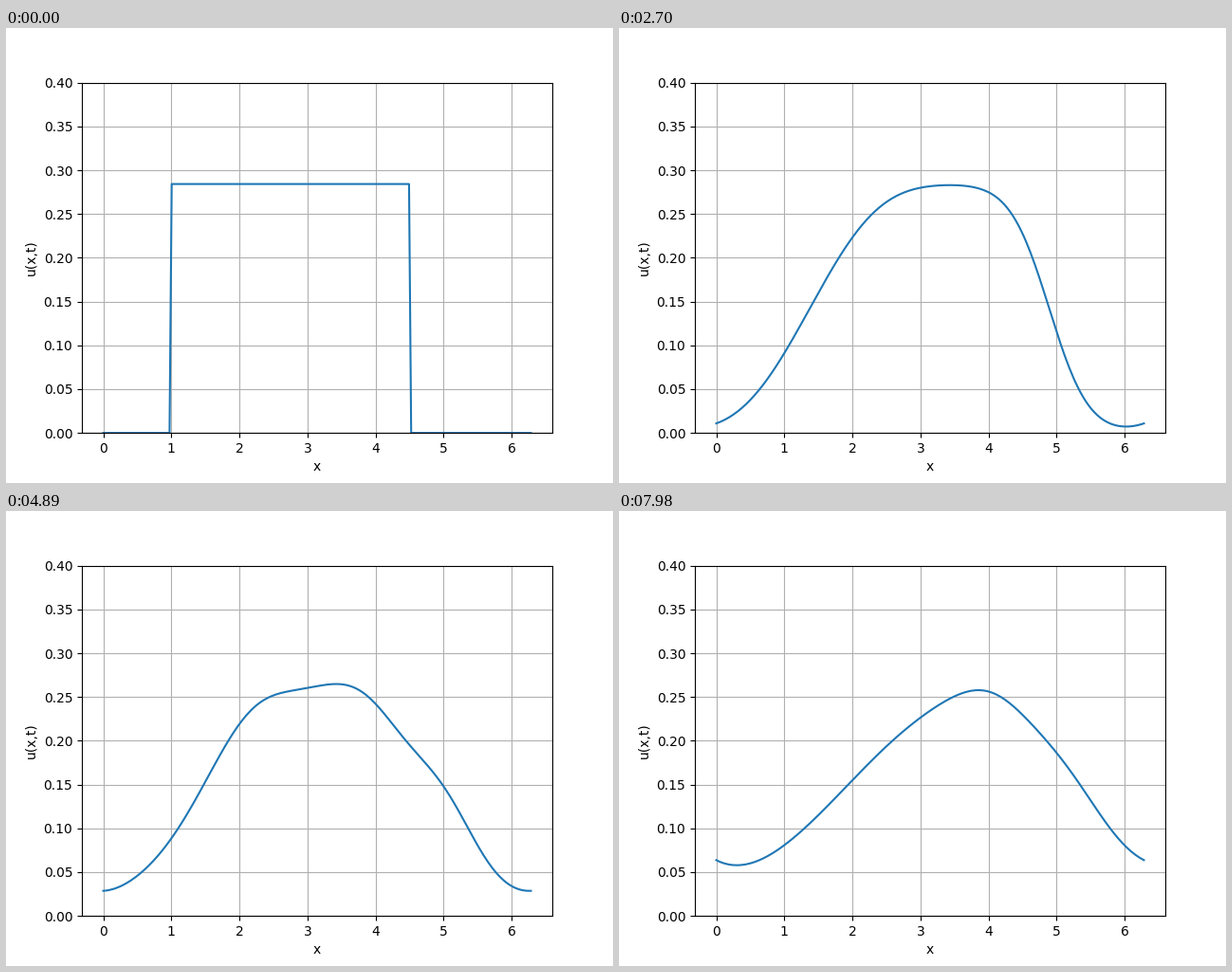
Recreate the animation shown at these times as a matplotlib script. Size 640 by 480 pixels, loop 8 s.

```python
import numpy as np
import matplotlib.pyplot as plt
from matplotlib.animation import FuncAnimation

# Viscous Burgers equation on a ring, with two pairs of opposite kicks
LOOP_MS = 8000
FRAMES = 267
N = 200
NU = 0.07
FRAME_DT = 0.03
SUBSTEPS = 10
WIDTH = 0.05

L = 2 * np.pi
dx = L / N
x = np.arange(N) * dx

# frame: (mass, place of the positive kick, place of the negative kick)
KICKS = {100: (0.068, 1.66, 4.11), 200: (0.0292, 3.655, 4.013)}


def gauss(center):
    return np.exp(-0.5 * ((x - center) / WIDTH) ** 2) / (WIDTH * np.sqrt(2 * np.pi))


def rate(u):
    right, left = np.roll(u, -1), np.roll(u, 1)
    advection = (right**2 - left**2) / (4 * dx)
    diffusion = NU * (right - 2 * u + left) / dx**2
    return diffusion - advection


def advance(u):
    dt = FRAME_DT / SUBSTEPS
    for _ in range(SUBSTEPS):
        k1 = rate(u)
        k2 = rate(u + dt * k1)
        u = u + dt * (k1 + k2) / 2
    return u


def solve():
    u = ((x >= 1) & (x <= 4.5)).astype(float)
    u /= u.sum() * dx
    states = [u]
    for n in range(1, FRAMES):
        u = advance(u)
        if n in KICKS:
            mass, plus, minus = KICKS[n]
            u = u + mass * (gauss(plus) - gauss(minus))
        states.append(u)
    return [np.append(s, s[0]) for s in states]


states = solve()

fig, ax = plt.subplots(figsize=(6.4, 4.8), dpi=100)
line, = ax.plot(np.append(x, L), states[0])
ax.set_ylim(0, 0.4)
ax.set_xlabel("x")
ax.set_ylabel("u(x,t)")
ax.grid(True)


def update(n):
    line.set_ydata(states[n])
    return line,


anim = FuncAnimation(fig, update, frames=FRAMES, interval=LOOP_MS / FRAMES,
                     repeat=True, repeat_delay=0, blit=False)
plt.show()
```
